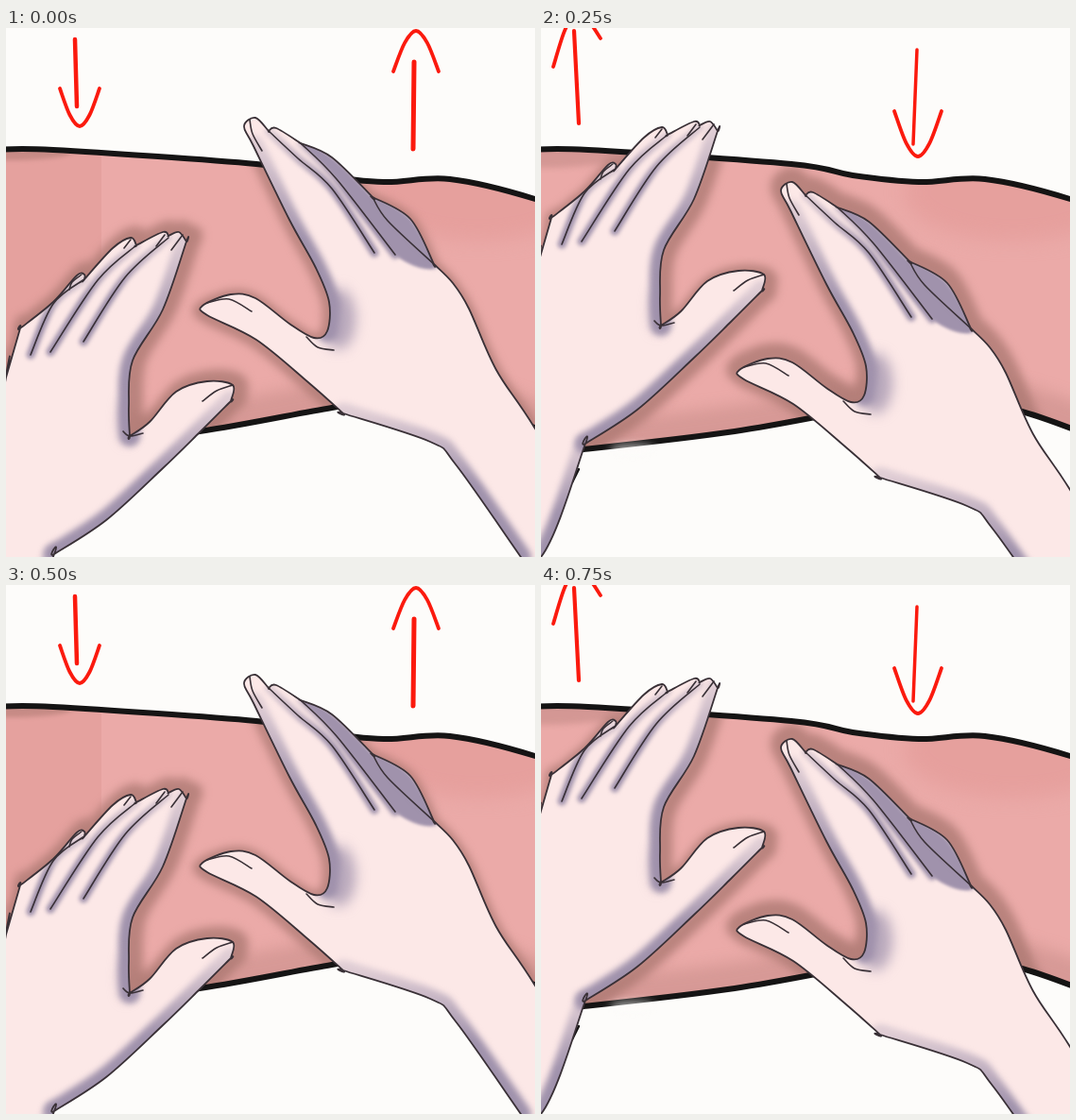
An HTML page with a canvas for the animation above (1 s loop, 560x560 px).

```html
<!DOCTYPE html>
<html lang="en">
<head>
<meta charset="utf-8">
<title>Massage strokes</title>
<style>
html, body { margin: 0; width: 100%; height: 100%; overflow: hidden; background: #fdfcfa; }
canvas { display: block; }
</style>
</head>
<body>
<canvas id="stage" width="560" height="560"></canvas>
<script>
const ctx = document.getElementById('stage').getContext('2d');
const PAPER = '#fdfcfa', ARM = '#ebaaa8', SKIN = '#fce8e7', INK = '#393036', BLACK = '#151414';
const PURPLE = '#a092ac', SHADE = '#a9766f', RED = '#fb1a0e';

const points = text => text.trim().split(/\s+/).map(s => s.split(',').map(Number));

// Smooth curve through points; a repeated point makes a corner.
function curve(p, closed) {
  const n = p.length, path = new Path2D();
  const at = i => closed ? p[(i + n) % n] : p[Math.max(0, Math.min(n - 1, i))];
  path.moveTo(...p[0]);
  for (let i = 0; i < (closed ? n : n - 1); i++) {
    const [a, b, c, d] = [at(i - 1), at(i), at(i + 1), at(i + 2)];
    path.bezierCurveTo(b[0] + (c[0] - a[0]) / 6, b[1] + (c[1] - a[1]) / 6,
      c[0] - (d[0] - b[0]) / 6, c[1] - (d[1] - b[1]) / 6, ...c);
  }
  return path;
}

function paint(path, color, { width, blur = 0, alpha = 1 } = {}) {
  ctx.save();
  ctx.globalAlpha = alpha;
  if (blur) ctx.filter = `blur(${blur}px)`;
  ctx.fillStyle = ctx.strokeStyle = color;
  if (width) {
    ctx.lineWidth = width;
    ctx.stroke(path);
  } else ctx.fill(path);
  ctx.restore();
}

function oval(x, y, rx, ry, color, look) {
  const path = new Path2D();
  path.ellipse(x, y, rx, ry, 0, 0, 2 * Math.PI);
  paint(path, color, look);
}

// A soft purple stroke that grows stronger towards its lower end.
function shadeAlong(p, width, blur) {
  const ys = p.map(q => q[1]);
  const fade = ctx.createLinearGradient(0, Math.min(...ys), 0, Math.max(...ys));
  fade.addColorStop(0, PURPLE + '50');
  fade.addColorStop(0.5, PURPLE);
  paint(curve(p), fade, { width, blur });
}

// Edges run clockwise or back to back round the hand; those in `dark` lie away from the light.
function makeHand({ edges, dark, fingers, creases, hidden = [], web }) {
  const sides = edges.map(points);
  return {
    shape: curve(sides.flat(), true),
    dark: dark.map(i => sides[i]),
    fingers: fingers.map(points),
    creases: creases.map(points),
    hidden: hidden.map(t => curve(points(t), true)),
    web
  };
}

const left = makeHand({
  edges: [
    '0,370 0,370 15,318', '15,318 50,290 75,262 83,261 83,266',
    '83,266 113,233 132,222 138,230', '138,230 166,216 172,220', '172,220 183,216 191,226',
    '191,226 166,298 134,352 130,400 131,432', '131,432 152,417 180,385 213,374 240,378 238,395',
    '238,395 205,428 165,467 106,521 51,557', '51,557 4,677 -60,700'
  ],
  dark: [5, 7, 8],
  fingers: ['83,266 50,292 26,346', '138,230 97,267 47,343', '172,222 126,264 82,332'],
  creases: ['80,261 70,269 67,277', '132,224 125,233', '168,219 159,231', '187,219 175,235',
    '240,378 223,384 208,395', '124,427 131,432 145,429'],
  web: [127, 415, 6, 24]
});

const right = makeHand({
  edges: [
    '252,104 264,95 278,109', '278,109 286,106 312,122', '312,122 345,137 388,179',
    '388,179 428,202 453,250', '453,250 473,270 490,297 519,362 560,424', '640,560 640,640 600,640',
    '545,560 476,462 449,438 357,408', '357,408 321,376 265,330 213,304 208,294 238,282 264,286 300,313 326,328',
    '340,321 342,290 328,254 300,203 262,125'
  ],
  dark: [6, 8],
  fingers: ['278,109 309,138 345,170 390,238', '312,122 350,160 412,240', '388,179 404,204 453,250'],
  creases: ['258,97 261,112 271,130', '213,291 236,287 260,300', '318,327 330,338 347,341'],
  hidden: ['312,122 345,137 388,179 453,250 412,240 350,160', '388,179 428,202 453,250 404,204'],
  web: [352, 308, 18, 32]
});

function drawHand(hand, [dx, dy]) {
  ctx.save();
  ctx.translate(dx, dy);
  paint(hand.shape, SKIN);
  ctx.save();
  ctx.clip(hand.shape);
  hand.dark.forEach(p => shadeAlong(p, 22, 3));
  hand.fingers.forEach(p => shadeAlong(p, 9, 2));
  hand.hidden.forEach(path => paint(path, PURPLE, { blur: 1.5 }));
  oval(...hand.web, PURPLE, { blur: 7, alpha: 0.75 });
  ctx.restore();
  [...hand.fingers, ...hand.creases].forEach(p => paint(curve(p), INK, { width: 1.6 }));
  paint(hand.shape, INK, { width: 1.8 });
  ctx.restore();
}

function castShadow(hand, [dx, dy], { x, y, width }) {
  ctx.save();
  ctx.translate(dx + x, dy + y);
  paint(hand.shape, SHADE, { width, blur: 5, alpha: 0.75 });
  ctx.restore();
}

// Arrow head: two arms of the given reach, mirrored about the tip.
function arrow({ tail, end, tip: [x, y], reach, rise, lean = 0, width }) {
  const arm = (side, t, h) => [x + side * t * reach, y + h * (rise - side * lean)];
  paint(curve([tail, end]), RED, { width });
  paint(curve([arm(-1, 1, 1), arm(-1, 0.5, 0.3), [x, y], arm(1, 0.5, 0.3), arm(1, 1, 1)]), RED, { width: 3.8 });
}

const armTop = points('-10,129 50,129 265,144 330,156 400,163 470,160 560,181 600,200');
const armLow = points('580,431 505,405 420,392 345,402 205,427 45,446 -10,450');
const arm = curve([...armTop, armTop.at(-1), armLow[0], ...armLow, armLow.at(-1), armTop[0]], true);

const poses = [
  {
    left: [0, 0], right: [0, 0],
    leftShadow: { x: 5, y: -2, width: 20 },
    rightShadow: { x: -1, y: 2, width: 13 },
    backdrop() {
      ctx.fillStyle = '#e5a19e';
      ctx.fillRect(0, 125, 101, 240);
      oval(0, 132, 70, 8, SHADE, { blur: 2, alpha: 0.5 });
    },
    details() {},
    arrows: [
      { tail: [73, 12], end: [75, 83], tip: [78, 104], reach: 21, rise: -40, width: 4.5 },
      { tail: [432, 36], end: [431, 128], tip: [434, 3], reach: 24, rise: 43, width: 5 }
    ]
  },
  {
    left: [-4, -117], right: [2, 68],
    leftShadow: { x: 4, y: 3, width: 18 },
    rightShadow: { x: 1, y: -4, width: 24 },
    backdrop() {
      oval(0, 132, 95, 16, SHADE, { blur: 3, alpha: 0.35 });
    },
    details() {
      oval(97, 446, 24, 6, PAPER, { blur: 4, alpha: 0.6 });
      paint(curve([[40, 467], [33, 481]]), BLACK, { width: 2.5 });
    },
    arrows: [
      { tail: [35, 3], end: [40, 101], tip: [38, -15], reach: 25, rise: 41, lean: 15, width: 4.2 },
      { tail: [398, 23], end: [394, 123], tip: [399, 136], reach: 25, rise: -48, width: 3.5 }
    ]
  }
];

function draw(pose) {
  ctx.fillStyle = PAPER;
  ctx.fillRect(0, 0, 560, 560);
  ctx.lineJoin = 'round';
  ctx.lineCap = 'round';

  ctx.save();
  ctx.clip(arm);
  paint(arm, ARM);
  oval(500, 175, 115, 50, '#e49c9a', { blur: 10, alpha: 0.75 });
  paint(curve(armLow), SHADE, { width: 55, blur: 8, alpha: 0.3 });
  pose.backdrop();
  castShadow(left, pose.left, pose.leftShadow);
  castShadow(right, pose.right, pose.rightShadow);
  ctx.restore();

  for (const edge of [armTop, armLow]) paint(curve(edge), BLACK, { width: 6, blur: 0.7 });
  pose.details();
  drawHand(left, pose.left);
  drawHand(right, pose.right);
  pose.arrows.forEach(arrow);
}

let shown;
function tick() {
  const pose = poses[Math.floor(performance.now() / 250) % poses.length];
  if (pose !== shown) draw(shown = pose);
  requestAnimationFrame(tick);
}
tick();
</script>
</body>
</html>
```
